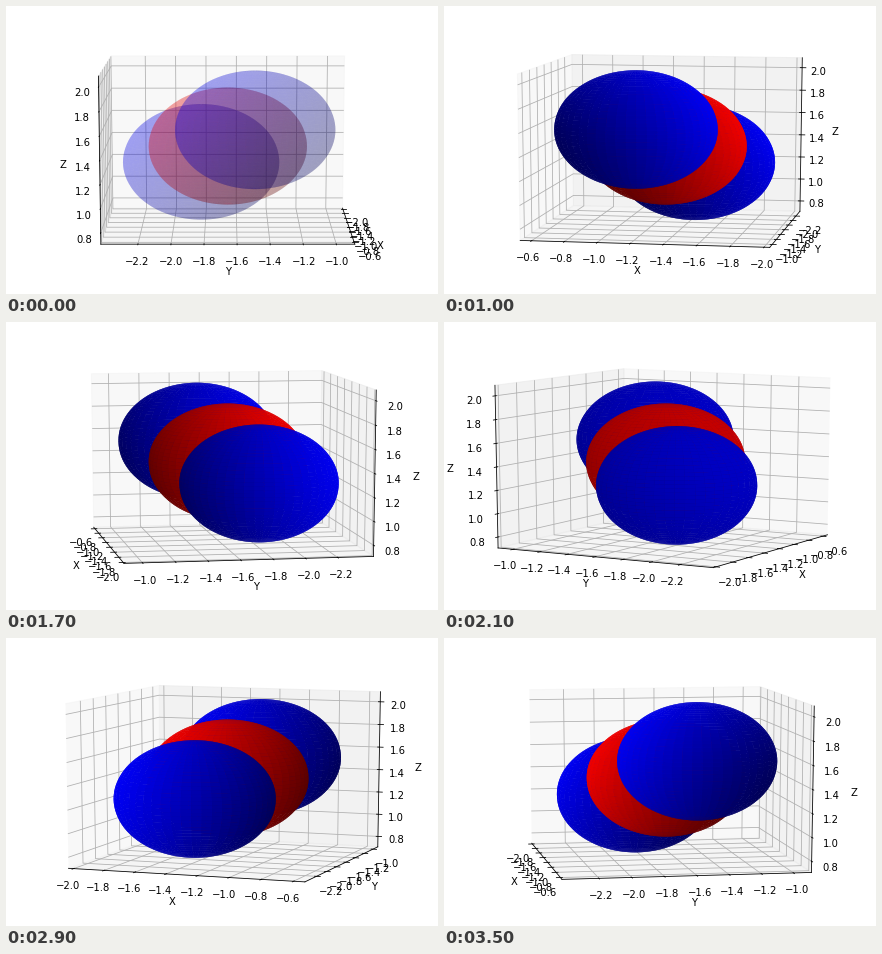
Recreate the animation shown at these times as a matplotlib script. Size 432 by 288 pixels, loop 3.6 s.

```python
import matplotlib.pyplot as plt
import numpy as np
from matplotlib.animation import FuncAnimation

FRAMES, STEP, ELEV = 36, 10, 10
FACETS = 50
LAYERS = 6              # translucent copies pile up, then look solid
ALPHA, THROUGH = 0.2, 0.7

MID = np.array([-1.282, -1.656, 1.397])
SHIFT = np.array([0.156, 0.1705, 0.1637])
RADIUS = 0.5
BALLS = [(MID - SHIFT, "b"), (MID, "r"), (MID + SHIFT, "b")]
RGB = {"b": (0, 0, 1), "r": (1, 0, 0)}
LIGHT = np.array([-1, -1, 0.5]) / 1.5


def sphere(u, v):
    return np.array([np.outer(np.cos(u), np.sin(v)),
                     np.outer(np.sin(u), np.sin(v)),
                     np.outer(np.ones_like(u), np.cos(v))])


def middles(a):
    return (a[1:] + a[:-1]) / 2


U = np.linspace(0, 2 * np.pi, FACETS + 1)
V = np.linspace(0, np.pi, FACETS + 1)
SHELL = RADIUS * sphere(U, V)
NORMALS = sphere(middles(U), middles(V)).reshape(3, -1).T


def shade(normals):
    return 0.3 + 0.35 * (normals @ LIGHT + 1)


def solid_shade(azim):
    """Blend of the near side and the far side showing through it."""
    a, e = np.radians([azim, ELEV])
    eye = np.array([np.cos(a) * np.cos(e), np.sin(a) * np.cos(e), np.sin(e)])
    far = NORMALS - 2 * np.outer(NORMALS @ eye, eye)
    return (shade(NORMALS) + THROUGH * shade(far)) / (1 + THROUGH)


fig = plt.figure(figsize=(6, 4), dpi=72)
ax = fig.add_axes((0, 0, 1, 1), projection="3d")
ax.apply_aspect = lambda position=None: None    # fill the whole stage
ax.set_box_aspect((1, 1, 1), zoom=np.sqrt(3) / 1.8294640721620434)


def add_ball(center, color, alpha=None):
    x, y, z = SHELL + center[:, None, None]
    return ax.plot_surface(x, y, z, rstride=1, cstride=1,
                           color=color, alpha=alpha)


layers = [[add_ball(c, color, ALPHA) for c, color in BALLS]
          for _ in range(LAYERS)]
solids = [add_ball(c, color) for c, color in BALLS]

half = (RADIUS + SHIFT) * np.array([1.1, 1.1, 1]) * 25 / 24
low, high = MID - half, MID + half
ax.set(xlim=(low[0], high[0]), ylim=(low[1], high[1]), zlim=(low[2], high[2]))
ax.set_xticks(np.linspace(-2.0, -0.6, 8))
ax.set_yticks(np.linspace(-2.2, -1.0, 7))
ax.set_zticks(np.linspace(0.8, 2.0, 7))
ax.set(xlabel="X", ylabel="Y", zlabel="Z")


def update(i):
    azim = i * STEP + 0.001     # settles which wall is behind at 0 degrees
    ax.view_init(elev=ELEV, azim=azim)
    solid = i >= LAYERS
    for n, layer in enumerate(layers):
        for ball in layer:
            ball.set_visible(not solid and n <= i)
    level = solid_shade(azim)
    for ball, (_, color) in zip(solids, BALLS):
        ball.set_visible(solid)
        ball.set_facecolor(np.outer(level, RGB[color]))


anim = FuncAnimation(fig, update, frames=FRAMES, interval=100,
                     repeat=True, repeat_delay=0, blit=False)
plt.show()
```
